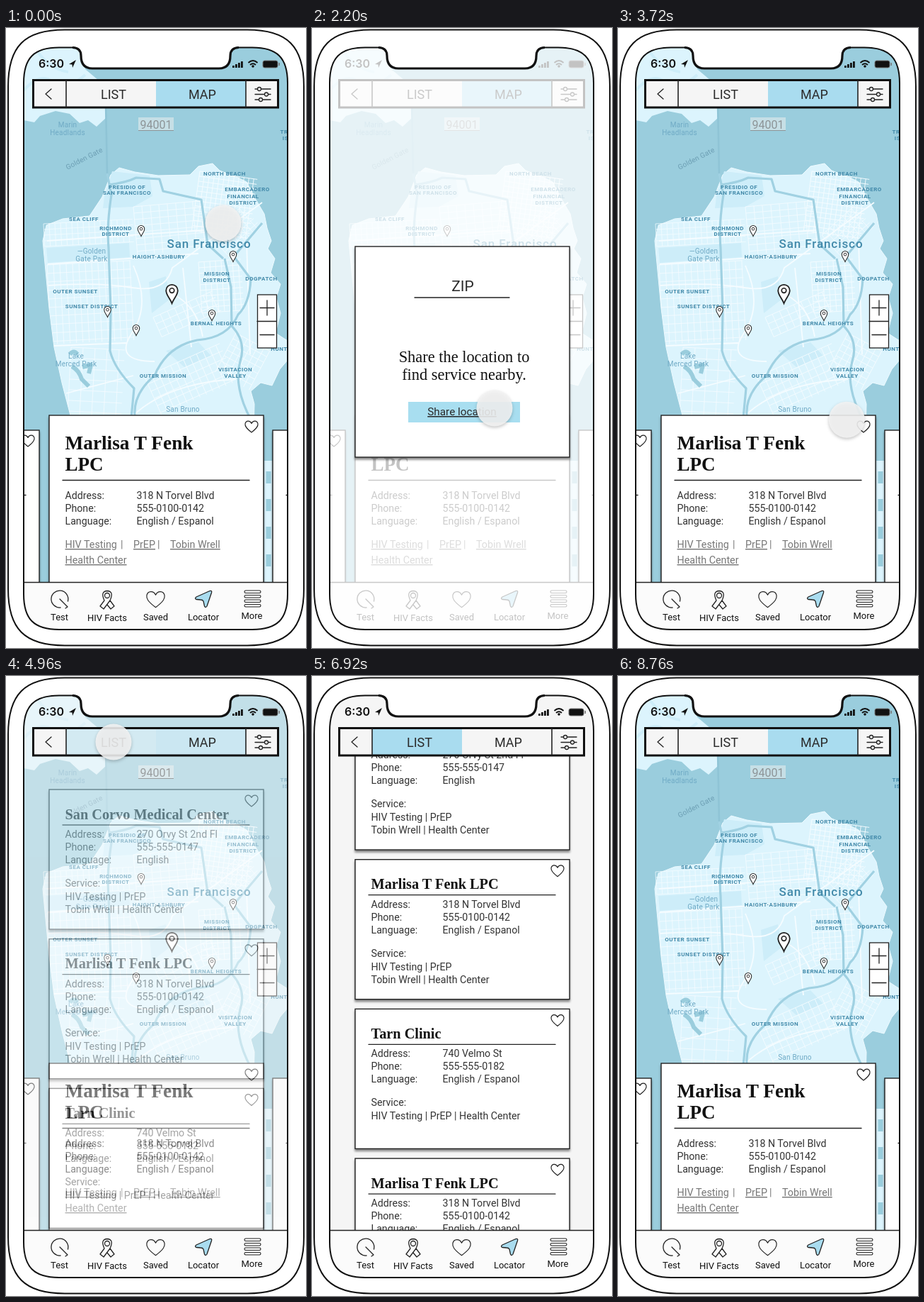
These frames come from a looping animation (424 by 874 pixels, 8.8 s). An HTML page:

```html
<!DOCTYPE html>
<html lang="en">
<head>
<meta charset="utf-8">
<title>Service locator</title>
<style>
  html, body { margin: 0; width: 100%; height: 100%; overflow: hidden; background: #fff; }
  svg { display: block; width: 100vw; height: 100vh; }
  text { font-family: Roboto, "Liberation Sans", sans-serif; fill: #2a2a2a; }
  .body { font-size: 14.2px; fill: #333; }
  .serif { font-family: "Liberation Serif", serif; fill: #111; }
  .link { font-size: 14.3px; fill: #777; }
  .tab { font-size: 13px; fill: #111; text-anchor: middle; }
  .place { font-size: 8px; font-weight: 700; letter-spacing: .5px; fill: #4189a9; text-anchor: middle; }
  .soft { font-size: 10px; fill: #6faac5; text-anchor: middle; letter-spacing: .2px; }
  .line { fill: none; stroke: #222; stroke-width: 1.3; stroke-linecap: round; stroke-linejoin: round; }
  .card { fill: #fff; stroke: #222; stroke-width: 1.4; filter: drop-shadow(0 3px 1.5px rgba(0,0,0,.45)); }
  .highway { fill: none; stroke: #a0d1e2; stroke-width: 3.2; stroke-linejoin: round; }
  .street { fill: none; stroke: #f5fcff; }
</style>
</head>
<body>
<svg id="stage" viewBox="0 0 424 874" preserveAspectRatio="none"></svg>
<script>
const LOOP = 8800;
const BLUE = '#a9dcef', WATER = '#9acddd', LAND = '#dcf4fd', PARK = '#cdedf9';

const text = (x, y, s, cls = 'body', extra = '') => `<text x="${x}" y="${y}" class="${cls}" ${extra}>${s}</text>`;
const rect = (x, y, w, h, extra = '') => `<rect x="${x}" y="${y}" width="${w}" height="${h}" ${extra}/>`;
const path = (d, extra = 'class="line"') => `<path d="${d}" ${extra}/>`;
const at = (x, y, s, scale = 1) => `<g transform="translate(${x} ${y}) scale(${scale})">${s}</g>`;
const places = (cls, list) => list.map(([x, y, s]) => text(x, y, s, cls)).join('');

// Rounded frame whose corners ease into the straight sides.
function squircle(x, y, w, h, r) {
  const c = r * .29, q = r - c;
  return `M${x + r} ${y}h${w - 2 * r}c${q} 0 ${r} ${c} ${r} ${r}v${h - 2 * r}c0 ${q} ${-c} ${r} ${-r} ${r}` +
    `h${2 * r - w}c${-q} 0 ${-r} ${-c} ${-r} ${-r}v${2 * r - h}c0 ${-q} ${c} ${-r} ${r} ${-r}Z`;
}

const heart = (x, y, scale = 1) => at(x, y, path(
  'M0 8C-8 2-9.5-1-9-4C-8-9-2-9 0-4.5C2-9 8-9 9-4C9.5-1 8 2 0 8Z',
  `class="line" style="stroke-width:${1.2 / scale}"`), scale);

const pin = (x, y, scale = 1) => at(x, y,
  path('M0 8C-2 3-5 1-5-3A5 5 0 0 1 5-3C5 1 2 3 0 8Z', 'fill="#fff" stroke="#222" stroke-width="1.1"') +
  '<circle cy="-3" r="2" fill="none" stroke="#222"/>', scale);

function header(active) {
  const fill = name => `fill="${name === active ? BLUE : '#f5f5f5'}"`;
  const label = (x, s) => text(x, 100, s, '', 'font-size="18" text-anchor="middle"');
  const slider = (y, knob) => `M352 ${y}H${knob - 2.5}M${knob + 2.5} ${y}H374` +
    `M${knob - 2.5} ${y}a2.5 2.5 0 1 0 5 0a2.5 2.5 0 1 0-5 0`;
  return rect(39, 73, 346, 39, 'fill="#f5f5f5"') +
    rect(85, 73, 127, 39, fill('LIST')) + rect(212, 73, 127, 39, fill('MAP')) +
    rect(38.5, 73.5, 346, 38.5, 'fill="none" stroke="#111" stroke-width="3"') +
    path('M85 73V112M339 73V112', 'stroke="#222" stroke-width="1.6"') +
    path('M64 86L56 93L64 100') + label(152, 'LIST') + label(277.5, 'MAP') +
    path(slider(86, 358) + slider(93.5, 368) + slider(101, 360));
}

function grid(x, y, w, h, stepX, stepY, angle, width) {
  let d = '';
  for (let i = 0; i <= w; i += stepX) d += `M${x + i} ${y}v${h}`;
  for (let j = 0; j <= h; j += stepY) d += `M${x} ${y + j}h${w}`;
  return path(d, `class="street" stroke-width="${width}" transform="rotate(${angle} ${x} ${y})"`);
}

function mapArt() {
  const city = 'M57 278L80 269L118 265L136 238L148 207L160 197L182 203L215 208L260 207L272 195L292 191' +
    'L302 201L328 211L340 217L352 240L365 262L369 282L375 300L370 311L380 325L374 345L388 361L382 380' +
    'L388 402L381 430L398 441V468L387 481L376 504L360 500L346 512L351 530L350 570H97L91 546L79 500' +
    'L68 450L61 395L52 300Z';
  const north = 'M25 27H105L112 58L131 74L139 98L142 126L128 139L116 130L104 134L90 121L70 117L48 124L40 133L25 130Z';
  return rect(24, 26, 376, 824, `fill="${WATER}"`) +
    path(north, `fill="${LAND}"`) + path(city, `fill="${LAND}" stroke="#edfaff" stroke-width="1"`) +
    path('M25 88Q48 62 66 76T112 66M40 27Q60 58 88 62M72 112Q92 92 136 112',
      `fill="none" stroke="${PARK}" stroke-width="4"`) +
    '<g clip-path="url(#city)">' +
      path('M139 238L150 202L203 208L207 237L180 252L137 254Z', `fill="${PARK}"`) +
      path('M57 310L174 303L175 323L59 331Z', `fill="${PARK}"`) +
      path('M202 358L226 350L232 382L206 402Z', `fill="${PARK}"`) +
      path('M226 455L272 443L290 462L252 478Z', `fill="${PARK}"`) +
      grid(53, 276, 126, 32, 8, 8, -3, .7) + grid(58, 334, 118, 112, 9, 12, -3, .8) +
      grid(180, 252, 98, 68, 12, 9, -5, .8) + grid(274, 202, 82, 86, 7, 7, 8, .9) +
      grid(272, 330, 60, 72, 8, 8, -4, .9) + grid(288, 292, 62, 40, 8, 8, -42, .8) +
      grid(208, 408, 92, 30, 11, 10, -24, .8) + grid(196, 492, 116, 58, 10, 11, -24, .8) +
      grid(325, 430, 54, 62, 9, 9, 28, .8) + grid(92, 450, 76, 100, 17, 15, 3, .8) +
      path('M58 300L280 285M59 333L272 318M60 363Q130 358 178 366T235 338L362 246M68 448L170 444' +
        'M180 335Q205 390 178 430T210 470M230 372Q270 390 278 435M250 338L262 450M340 300L345 460' +
        'M85 515L180 490M180 546Q230 500 325 495', 'class="street" stroke-width="1.8"') +
      path('M90 460Q96 453 101 460M93 477Q103 482 107 495L117 505M108 478L120 475L117 487',
        `fill="none" stroke="${WATER}" stroke-width="6" stroke-linejoin="round"`) +
    '</g>' +
    path('M141 105L143 207', 'stroke="#8fc4d6" stroke-width="2.6"') +
    path('M143 205L149 235Q142 280 145 310L148 400L147 455Q153 480 181 508L176 560', 'class="highway"') +
    path('M145 221Q170 218 184 211L217 213L222 230L276 242L285 305L307 325', 'class="highway"') +
    path('M182 546Q180 515 210 490Q227 449 270 440Q314 437 328 404Q344 389 346 354L322 322L362 275', 'class="highway"') +
    path('M309 325L318 365L319 420Q340 442 331 470Q321 505 346 552', 'class="highway"') +
    rect(365, 610, 12, 172, `fill="${LAND}"`) +
    path('M371 625V780', `stroke="${WATER}" stroke-width="7" stroke-dasharray="17 22"`) +
    places('place', [
      [309, 208, 'NORTH BEACH'], [341, 230, 'EMBARCADERO'], [335, 240, 'FINANCIAL'], [335, 249, 'DISTRICT'],
      [171, 227, 'PRESIDIO OF'], [171, 235, 'SAN FRANCISCO'], [110, 272, 'SEA CLIFF'], [155, 285, 'RICHMOND'],
      [155, 293, 'DISTRICT'], [216, 325, 'HAIGHT-ASHBURY'], [298, 349, 'MISSION'], [298, 358, 'DISTRICT'],
      [361, 356, 'DOGPATCH'], [98, 374, 'OUTER SUNSET'], [121, 395, 'SUNSET DISTRICT'],
      [297, 419, 'BERNAL HEIGHTS'], [222, 493, 'OUTER MISSION'], [324, 484, 'VISITACION'],
      [324, 493, 'VALLEY'], [386, 455, 'HUNT'], [393, 149, 'TR'], [395, 158, 'IS']]) +
    places('soft', [[87, 140, 'Marin'], [87, 151, 'Headlands'], [121, 318, '—Golden'], [121, 329, 'Gate Park'],
      [99, 466, 'Lake'], [99, 477, 'Merced Park'], [250, 541, 'San Bruno']]) +
    text(0, 0, 'Golden Gate', 'soft', 'transform="translate(112 187) rotate(-27)" style="fill:#6c9eb3"') +
    text(287, 310, 'San Francisco', 'place', 'style="font-size:17px;font-weight:500;letter-spacing:.9px"');
}

const underlined = (x, y, s) => text(x, y, s, 'link', 'text-decoration="underline" style="text-underline-offset:3px"');
const facts = (y, rows) => ['Address:', 'Phone:', 'Language:'].map((label, i) =>
  text(83.5, y + i * 18, label) + text(184.5, y + i * 18, rows[i])).join('');

const clinics = [
  ['San Corvo Medical Center', '270 Orvy St 2nd Fl', '555-555-0147', 'English', true],
  ['Marlisa T Fenk LPC', '318 N Torvel Blvd', '555-0100-0142', 'English / Espanol', true],
  ['Tarn Clinic', '740 Velmo St', '555-555-0182', 'English / Espanol', false]
];
clinics.push(clinics[1]);

function zip(colour) {
  return text(212, 141.5, '94001', '', `font-size="16" text-anchor="middle" style="fill:${colour}"`) +
    path('M187 144.5H237', `stroke="${colour}" stroke-width="1.2"`);
}

function mapScreen() {
  const main = clinics[1];
  return mapArt() +
    rect(187, 126, 50, 18, 'fill="#c6dfe6"') + zip('#8d9497') +
    [[191, 286], [321, 322], [143.5, 400], [184, 426], [291, 405]].map(p => pin(...p, .95)).join('') +
    pin(234.5, 375, 1.65) +
    rect(355.5, 376, 27, 75, 'fill="#fff" stroke="#222" stroke-width="1.3"') +
    path('M355 413.5H382M359 394.5H379M369 384V405M359 432.5H379') +
    rect(0, 567, 47, 240, 'class="card"') + rect(377, 567, 60, 240, 'class="card"') +
    heart(31, 582) + path('M25 658.5H28M396 658.5H399') +
    rect(61, 546, 303, 260, 'class="card"') + heart(347, 562) +
    text(83.5, 593.5, 'Marlisa T Fenk', 'serif', 'font-size="27.3" font-weight="700"') +
    text(83.5, 623.5, 'LPC', 'serif', 'font-size="27" font-weight="700"') +
    path('M80 637.5H344') + facts(664, main.slice(1, 4)) +
    underlined(83.5, 733, 'HIV Testing') + text(162, 733, '|', 'link') + underlined(180, 733, 'PrEP') +
    text(214, 733, '|', 'link') + underlined(232, 733, 'Tobin Wrell') + underlined(83.5, 755, 'Health Center') +
    header('MAP');
}

const listCard = ([name, street, phone, language, full], i) => at(0, 160 + i * 210.7,
  rect(61, 0, 303, 197, 'class="card"') + heart(347, 16) +
  text(83.5, 41.5, name, 'serif', 'font-size="20.3" font-weight="700"') +
  path('M80 50H344') + facts(68, [street, phone, language]) +
  text(83.5, 137, 'Service:') +
  text(83.5, 156, full ? 'HIV Testing | PrEP' : 'HIV Testing | PrEP | Health Center') +
  (full ? text(83.5, 174, 'Tobin Wrell | Health Center') : ''));

const listScreen = () => rect(24, 26, 376, 824, 'fill="#f5f5f5"') +
  `<g clip-path="url(#viewport)"><g id="scroll">${zip('#a8a8a8')}${clinics.map(listCard).join('')}</g></g>` +
  header('LIST');

const statusBar = () =>
  text(46, 56, '6:30', '', 'style="font:600 16px Inter,sans-serif;fill:#111"') +
  path('M89 51L99 45L94 56L93.5 51.5Z', 'fill="#111"') +
  [0, 1, 2, 3].map(i => rect(320 + i * 4, 53 - i * 2, 2.8, 3 + i * 2, 'fill="#111" rx=".6"')).join('') +
  path('M342.5 49Q349 43 355.5 49M345 52Q349 48.5 353 52', 'fill="none" stroke="#111" stroke-width="2"') +
  '<circle cx="349" cy="54" r="1.8" fill="#111"/>' +
  rect(363, 46, 21, 10, 'rx="2.5" fill="#111" stroke="#777"') + rect(385.5, 49, 1.5, 4, 'fill="#777"');

const tabBar = () => rect(24, 781, 376, 70, 'fill="#fbfbfb"') + path('M24 781.5H400') +
  path('M77 817A12 12 0 1 1 87.5 808M76 805L87 816L84 818') +
  path('M139 807Q133 794 143 793.5Q153 794 147 807L138 819L133 815L139 807M147 807L153 815L148 819L143 813') +
  '<circle cx="143" cy="800" r="3.5" class="line"/>' +
  heart(211.5, 805.5, 1.4) +
  path('M269 802L288 793.5Q291.5 792.5 290.500 796L284 815Q282 818 280.500 815L279 808Q278 806 275 806' +
    'L269 805.500Q266 804 269 802Z', `class="line" style="fill:${BLUE}"`) +
  [794, 800.5, 807, 813.5].map(y => rect(337, y - 1, 23, 3.5, 'rx="1.7" class="line" style="stroke-width:1.1"')).join('') +
  places('tab', [[75.5, 835, 'Test'], [143, 836, 'HIV Facts'], [211.5, 835, 'Saved'], [279, 835, 'Locator'], [347.5, 833, 'More']]);

const dialog = () => rect(61, 308, 303, 297, 'class="card"') +
  text(213, 371, 'ZIP', '', 'font-size="21" text-anchor="middle"') + path('M145 380H279') +
  text(215, 471, 'Share the location to', 'serif', 'font-size="22.4" text-anchor="middle"') +
  text(215, 496, 'find service nearby.', 'serif', 'font-size="22.4" text-anchor="middle"') +
  rect(136, 527, 158, 29, 'fill="#a8def0"') +
  text(212, 546, 'Share location', '', 'font-size="15.3" text-anchor="middle" text-decoration="underline"');

const screenShape = squircle(25, 27.5, 373, 820.5, 50);
const notch = 'Q106 28 106 39Q106 57 122 57H301Q317 57 317 39Q317 28';
const stage = document.getElementById('stage');
stage.innerHTML = `<defs>
  <clipPath id="screenClip">${path(screenShape, '')}</clipPath>
  <clipPath id="viewport">${rect(24, 112, 376, 669)}</clipPath>
  <clipPath id="city">${path('M52 190H392V570H97L91 546L79 500L68 450L61 395L52 300Z', '')}</clipPath></defs>
  ${rect(0, 0, 424, 874, 'fill="#fff"')}
  <g clip-path="url(#screenClip)">
    <g id="map">${mapScreen()}</g><g id="list">${listScreen()}</g>${statusBar()}${tabBar()}
    <g id="modal">${rect(24, 26, 376, 824, 'fill="#fff" opacity=".75"')}${dialog()}</g>
    <g id="touch"><circle r="25.5" fill="#f3f3f3" fill-opacity=".88" style="filter:drop-shadow(0 2px 2px rgba(0,0,0,.25))"/></g>
  </g>
  ${path(squircle(3, 2.5, 418, 868, 80), 'fill="none" stroke="#111" stroke-width="2"')}
  ${path(screenShape, 'fill="none" stroke="#111" stroke-width="2"')}
  ${path(`M96 24V27${notch} 327 27V24Z`, 'fill="#fff"')}
  ${path(`M94 27.5${notch} 329 27.5`, 'fill="none" stroke="#111" stroke-width="3.2"')}`;

const [list, scroll, modal, touch] = ['list', 'scroll', 'modal', 'touch'].map(id => document.getElementById(id));

// Eased value between [time, value] keys.
function track(t, keys) {
  if (t <= keys[0][0]) return keys[0][1];
  for (let i = 1; i < keys.length; i++) {
    const [t0, a] = keys[i - 1], [t1, b] = keys[i];
    if (t < t1) {
      const p = (t - t0) / (t1 - t0);
      return a + (b - a) * p * p * (3 - 2 * p);
    }
  }
  return keys[keys.length - 1][1];
}

const keys = {
  list: [[4800, 0], [5150, 1], [7750, 1], [8100, 0]],
  modal: [[920, 0], [1250, 1], [2480, 1], [2800, 0]],
  scroll: [[6105, 0], [6750, -112], [6940, -112], [7400, 0]],
  x: [[0, 307], [650, 212], [1250, 212], [1900, 258], [3000, 258], [4090, 347], [4200, 347], [4700, 152],
    [5150, 152], [5850, 301], [6900, 301], [6901, 284]],
  y: [[0, 275], [650, 135], [1250, 135], [1900, 536], [3000, 536], [4090, 558], [4200, 558], [4700, 93],
    [5150, 93], [5850, 490], [6105, 490], [6750, 378], [6900, 378], [6901, 93]],
  touch: [[6600, 1], [6850, 0], [7150, 0], [7350, 1], [7900, 1], [8200, 0]]
};

function render(t) {
  const v = name => track(t, keys[name]);
  list.setAttribute('opacity', v('list'));
  modal.setAttribute('opacity', v('modal'));
  touch.setAttribute('opacity', v('touch'));
  scroll.setAttribute('transform', `translate(0 ${v('scroll')})`);
  touch.setAttribute('transform', `translate(${v('x')} ${v('y')})`);
}

const start = performance.now();
function frame() {
  render((performance.now() - start) % LOOP);
  requestAnimationFrame(frame);
}
render(0);
requestAnimationFrame(frame);
</script>
</body>
</html>
```
